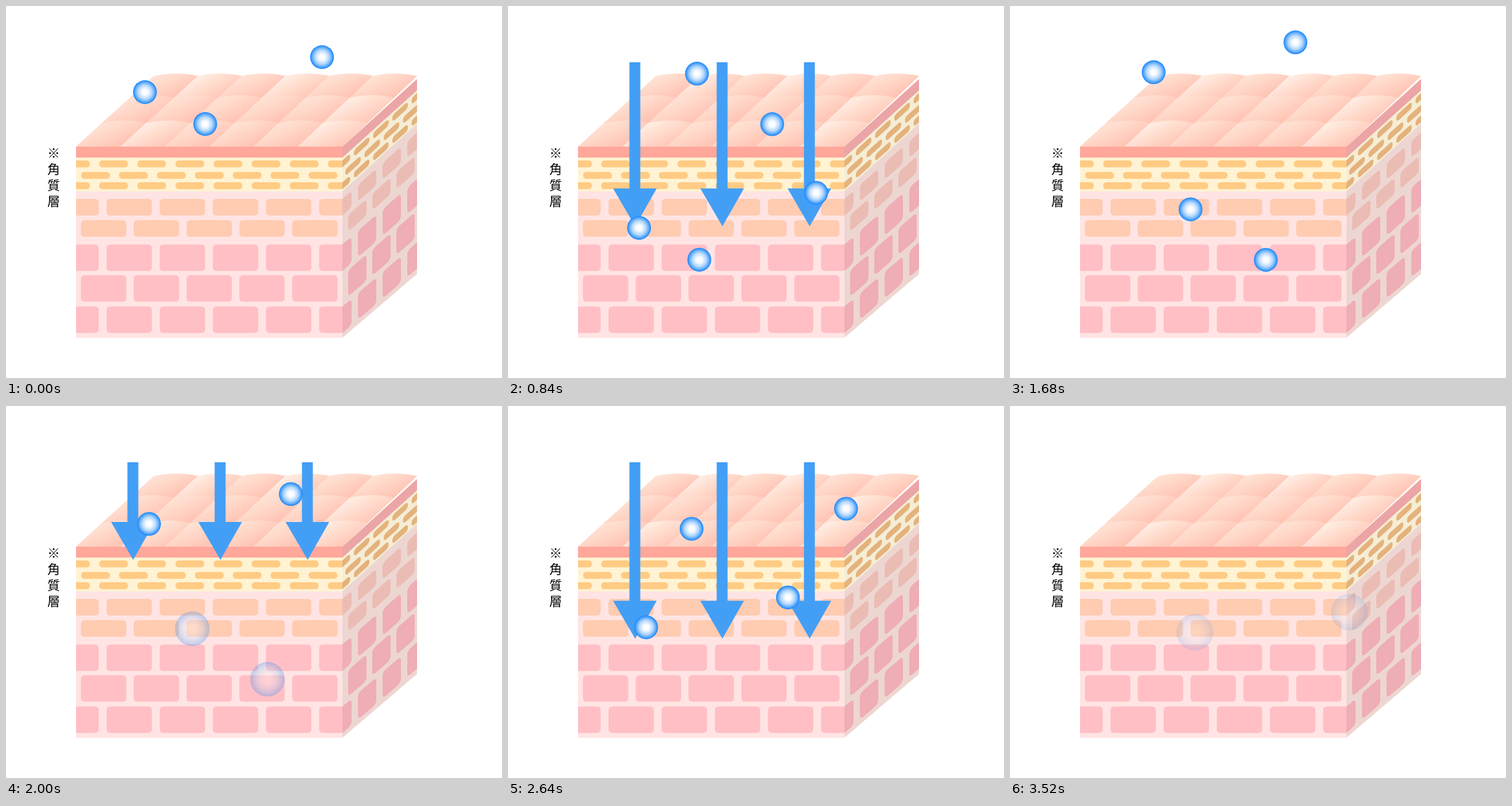
An HTML page that plays this animation: 864 px wide and 648 px high, repeating every 3.56 s.

```html
<!DOCTYPE html>
<html lang="zh-Hant">
<head>
<meta charset="utf-8">
<title>角質層</title>
<style>
  html, body { margin: 0; width: 100%; height: 100%; overflow: hidden; background: #fff; }
  svg { display: block; width: 864px; height: 648px; }
  text { font: 300 22px "Noto Sans CJK TC", "Noto Sans CJK JP", "Noto Sans CJK", sans-serif; text-anchor: middle; }
</style>
</head>
<body>
<svg id="stage" viewBox="0 0 864 648">
  <defs>
    <radialGradient id="ball">
      <stop offset="0" stop-color="#fff"/>
      <stop offset=".25" stop-color="#f8fbff"/>
      <stop offset=".6" stop-color="#b0d6fd"/>
      <stop offset=".85" stop-color="#53a6fb"/>
      <stop offset="1" stop-color="#1583fb"/>
    </radialGradient>
    <linearGradient id="soft">
      <stop offset="0" stop-color="#ffdfd1"/>
      <stop offset=".5" stop-color="#ffd2c2"/>
      <stop offset="1" stop-color="#ffc0b0"/>
    </linearGradient>
    <linearGradient id="bright">
      <stop offset="0" stop-color="#fff0e7"/>
      <stop offset=".5" stop-color="#ffdccd"/>
      <stop offset="1" stop-color="#ffc8b7"/>
    </linearGradient>
    <linearGradient id="sheen" x2="0" y2="1">
      <stop offset="0" stop-color="#ffc4b4" stop-opacity=".35"/>
      <stop offset="1" stop-color="#fff0e4" stop-opacity=".3"/>
    </linearGradient>
    <clipPath id="frontClip"><path d="M122 245H586V578H122Z"/></clipPath>
    <clipPath id="sideClip"><path d="M586 245L716 127V467L586 578Z"/></clipPath>
  </defs>
  <g id="top"><path d="M122 245L258 122H716L586 245Z" fill="#ffcfbf"/></g>
  <g id="front" clip-path="url(#frontClip)">
    <path d="M122 245H586V578H122Z" fill="#ffe4e3"/>
    <path d="M122 245H586V323H122Z" fill="#fff3d3"/>
    <path d="M122 245H586V264H122Z" fill="#ffa79b"/>
  </g>
  <g id="side" clip-path="url(#sideClip)">
    <path d="M586 245L716 127V467L586 578Z" fill="#edd6d1"/>
    <path d="M586 245L716 127V205L586 323Z" fill="#f5edd4"/>
    <path d="M586 245L716 127V147L586 264Z" fill="#eca5a6"/>
  </g>
  <g id="label">
    <text x="83" y="264">※</text>
    <text x="83" y="292">角</text>
    <text x="83" y="320">質</text>
    <text x="83" y="348">層</text>
  </g>
  <path id="arrows" fill="#439ff5"/>
  <g id="balls" fill="url(#ball)"></g>
</svg>
<script>
const $ = id => document.getElementById(id);

function add(parent, tag, attrs) {
  const el = document.createElementNS('http://www.w3.org/2000/svg', tag);
  for (const key in attrs) el.setAttribute(key, attrs[key]);
  parent.append(el);
  return el;
}

function row(parent, x0, end, pitch, y, width, height, rx, fill) {
  for (let x = x0; x < end; x += pitch) add(parent, 'rect', { x, y, width, height, rx, fill });
}

// Top surface: three rows of bulging tiles, back to front
const rowY = [245, 204, 160, 122], rowX = [122, 167, 216, 258];
const brightTiles = ['0,1', '0,5', '2,3', '1,5', '2,1'];
for (let r = 2; r >= 0; r--) {
  const w = 77.3 - r * 0.4;
  for (let c = 0; c < 6; c++) {
    const dx = rowX[r + 1] - rowX[r] - c * 0.4, dy = rowY[r + 1] - rowY[r];
    const tile = add($('top'), 'g', { transform: `matrix(${w} 0 ${dx} ${dy} ${rowX[r] + c * w} ${rowY[r]})` });
    const d = 'M0 0V1Q.4 1.22 1.01 1V0Z';
    const tone = brightTiles.includes(r + ',' + c) ? 'bright' : 'soft';
    add(tile, 'path', { d, fill: `url(#${tone})` });
    add(tile, 'path', { d, fill: 'url(#sheen)' });
  }
}

// Brick rows: y, height, offset row?, size class, front colour, side colour
const small = { even: [96, 66.4], odd: [131, 66], w: 50, rx: 5.5, sideEven: [-13.5, 33.5], sideOdd: [5, 33.5], sideW: 27, sideRx: 5 };
const large = { even: [82.5, 92.6], odd: [130.5, 92], w: 79, rx: 6, sideEven: [-16, 43], sideOdd: [10, 42], sideW: 32, sideRx: 6 };
const rows = [
  [269, 12, 0, small, '#ffcb85', '#e4b27d'],
  [289, 12, 1, small, '#ffcb85', '#e4b27d'],
  [307, 12, 0, small, '#ffcb85', '#e4b27d'],
  [336, 29, 0, large, '#ffcbb1', '#ebbcb3'],
  [373, 29, 1, large, '#ffcbb1', '#ebbcb3'],
  [415.5, 46, 0, large, '#ffbfc5', '#efadb5'],
  [469, 46, 1, large, '#ffbfc5', '#efadb5'],
  [523.5, 46, 0, large, '#ffbfc5', '#efadb5']
];
for (const [y, h, odd, kind, frontFill, sideFill] of rows) {
  const [x, pitch] = odd ? kind.odd : kind.even;
  row($('front'), x, 586, pitch, y, kind.w, h, kind.rx, frontFill);
  const slope = 0.908 - 0.054 * (y + h / 2 - 245) / 333;
  const skewed = add($('side'), 'g', { transform: `matrix(1 ${-slope} 0 1 586 0)` });
  const [sx, sidePitch] = odd ? kind.sideOdd : kind.sideEven;
  row(skewed, sx, 130, sidePitch, y, kind.sideW, h, kind.sideRx, sideFill);
}

const LOOP = 3560, STEP = 40, FALL = 1080, FADE = 280;

// Start time, x, y
const balls = [
  [0, 242, 150], [0, 347, 205.5], [0, 550.5, 89],
  [720, 324.5, 84], [720, 455.5, 172],
  [1640, 248, 104], [1640, 495, 52],
  [2200, 322, 90], [2200, 591, 55]
].map(([start, x, y]) => ({ start, x, y, el: add($('balls'), 'circle', {}) }));

const clamp = v => Math.min(1, Math.max(0, v));

function drawBall({ start, x, y, el }, t) {
  const age = t - start;
  const u = clamp(age / FALL);
  const out = clamp((age - FALL) / FADE);
  el.setAttribute('cx', x + 190 * u * (u - 0.36) * (u - 1));
  el.setAttribute('cy', y + 304 * u);
  el.setAttribute('r', 20.7 + 13 * out);
  el.setAttribute('opacity', age < 0 ? 0 : 1 - out);
}

function drawArrows(t) {
  const age = t < 1640 ? t : t - 1640;
  const base = 371 - 273 * (1 - clamp((age - 100) / 1760)) ** 3;
  const d = [221, 373, 525].map(x =>
    `M${x - 9.5} 98h19V${base}h28.5L${x + 0.5} ${base + 66}L${x - 38} ${base}h28.5Z`).join('');
  $('arrows').setAttribute('d', d);
  $('arrows').setAttribute('opacity', Math.min(clamp((age - 100) / 120), clamp((1600 - age) / 240)));
}

function frame(now) {
  const t = Math.floor(now % LOOP / STEP) * STEP;
  for (const ball of balls) drawBall(ball, t);
  drawArrows(t);
  requestAnimationFrame(frame);
}
frame(0);
</script>
</body>
</html>
```
